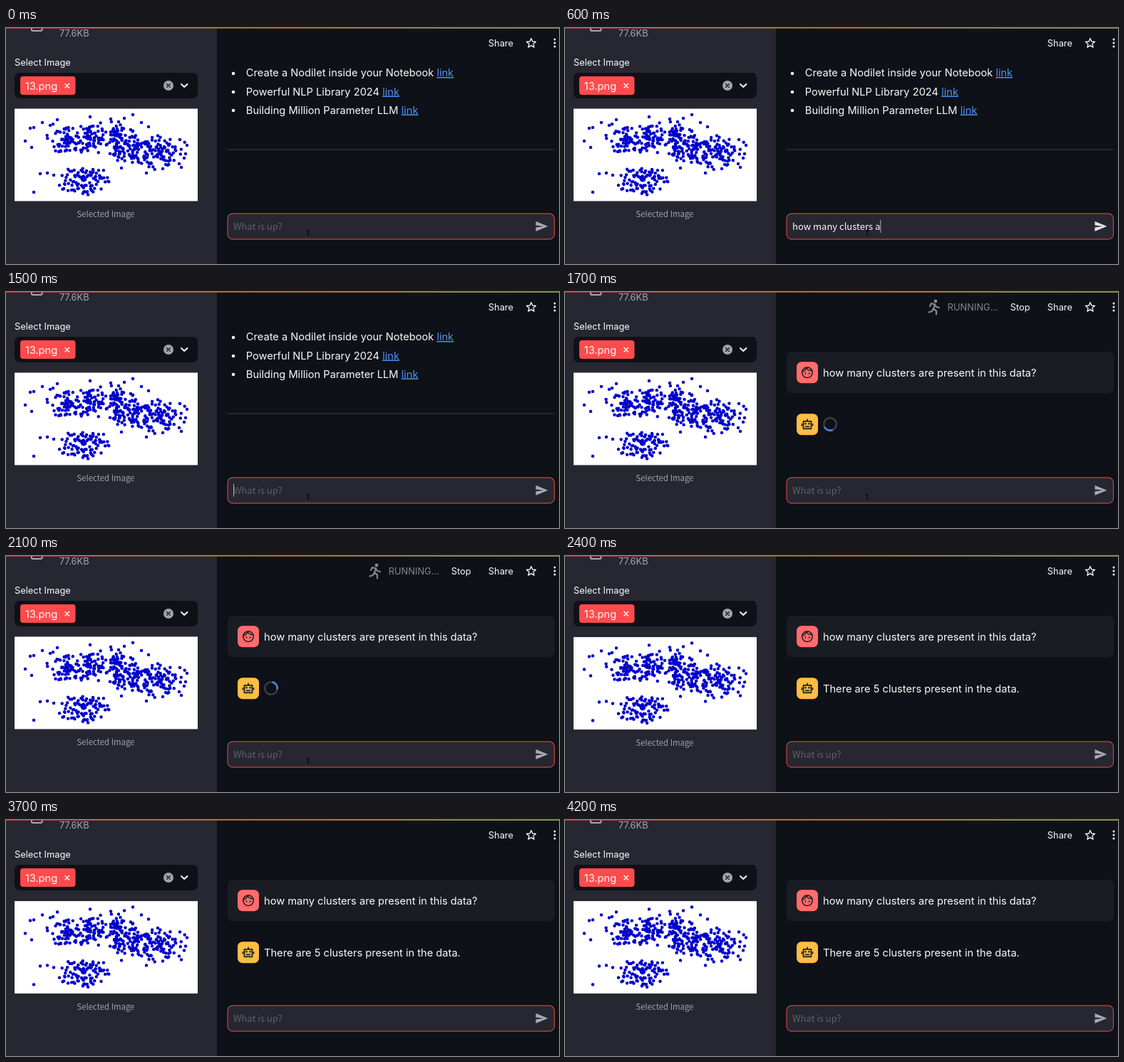
Recreate the animation shown at these times as an HTML page. Size 776 by 332 pixels, loop 4.3 s.

```html
<!DOCTYPE html>
<html lang="en">
<head>
<meta charset="utf-8">
<title>Chat about an image</title>
<style>
  html, body { margin: 0; width: 100%; height: 100%; overflow: hidden; background: #0e1117; }
  svg { display: block; width: 776px; height: 332px; }
  text { font: 14.65px Inter, sans-serif; fill: #fafafa; white-space: pre; }
  .small { font-size: 12.85px; }
  .source { font: 13px "Noto Sans CJK JP", "Noto Sans CJK SC", "Noto Sans CJK", sans-serif; }
  .link { fill: #4d92f5; text-decoration: underline; }
  .line { fill: none; stroke: #fafafa; stroke-width: 1.5; stroke-linecap: round; stroke-linejoin: round; }
  .dark { stroke: #1b1c22; }
</style>
</head>
<body>
<svg viewBox="0 0 776 332">
  <defs>
    <linearGradient id="glow">
      <stop stop-color="#ff4b4b"/><stop offset="1" stop-color="#fffd80"/>
    </linearGradient>
  </defs>
  <rect width="776" height="332" fill="#0e1117"/>

  <!-- sidebar -->
  <rect width="296" height="332" fill="#262730"/>
  <rect x="36" y="-12" width="14.5" height="16" rx="1.5" class="line" style="stroke:#a5a6ad;stroke-width:2"/>
  <text x="75" y="12" class="small" style="fill:#a5a6ad">77.6KB</text>
  <text x="12" y="53" class="small">Select Image</text>
  <rect x="12" y="63" width="257" height="36" rx="7" fill="#0e1117"/>
  <rect x="20" y="68" width="77.5" height="26" rx="4" fill="#ff4b4b"/>
  <text x="26.7" y="86.5">13.png</text>
  <path class="line" d="M83 78.5l5.5 5.5m0-5.5l-5.5 5.5"/>
  <circle cx="228" cy="81" r="7" fill="#a3a4ab"/>
  <path class="line dark" d="M225.7 78.7l4.6 4.6m0-4.6l-4.6 4.6"/>
  <path class="line" style="stroke-width:2" d="M246 79l4.2 4 4.2-4"/>
  <g id="preview">
    <rect x="12" y="113.5" width="257" height="130" fill="#fff"/>
    <path id="dots" fill="none" stroke="#0000cd" stroke-width="4.5" stroke-linecap="round"/>
    <text x="99.5" y="266" class="source" style="font-size:11.35px;fill:#a0a1a8">Selected Image</text>
  </g>

  <!-- toolbar -->
  <text x="676.8" y="25.5" class="small">Share</text>
  <path id="star" class="line" style="stroke-width:1.3"/>
  <g fill="#fafafa"><circle cx="770" cy="16" r="1.5"/><circle cx="770" cy="21" r="1.5"/><circle cx="770" cy="26" r="1.5"/></g>
  <g id="running">
    <circle cx="520" cy="13" r="2.4" fill="#85878d"/>
    <path class="line" style="stroke:#85878d;stroke-width:2.2" d="M512 20l2-4 5 1.5-2 6 4 3v5M517 23l-2 4-4.5 1.5M519 17.5l2 3.5 4 1"/>
    <text x="536.8" y="25.5" class="small" style="fill:#85878d">RUNNING...</text>
    <text x="624.8" y="25.5" class="small">Stop</text>
  </g>

  <g id="links">
    <g fill="#fafafa"><circle cx="319" cy="64" r="2.3"/><circle cx="319" cy="90" r="2.3"/><circle cx="319" cy="116" r="2.3"/></g>
    <text x="336.8" y="68">Create a Nodilet inside your Notebook <tspan class="link">link</tspan></text>
    <text x="336.8" y="94.5">Powerful NLP Library 2024 <tspan class="link">link</tspan></text>
    <text x="336.8" y="120.5">Building Million Parameter LLM <tspan class="link">link</tspan></text>
    <rect x="311" y="170.5" width="459" height="1" fill="#3b3e46"/>
  </g>

  <g id="chat">
    <rect x="311" y="84" width="459" height="58.5" rx="7" fill="#1a1c24"/>
    <g transform="translate(340 113.3)">
      <rect x="-15" y="-15" width="30" height="30" rx="7" fill="#ff6c6c"/>
      <circle class="line dark" r="7.3"/>
      <path class="line dark" d="M-6.5-1.5q4-1 5.5-5 3 4.5 8 4"/>
      <g fill="#1b1c22"><circle cx="-2.7" cy="1.3" r="1.1"/><circle cx="2.7" cy="1.3" r="1.1"/></g>
    </g>
    <text x="362" y="118.6" id="question"></text>
    <g transform="translate(340 186.3)">
      <rect x="-15" y="-15" width="30" height="30" rx="7" fill="#ffbd45"/>
      <path class="line dark" style="stroke-width:1.7" d="M-5.5-4.5h11v10.500h-11zM0-4.500v-2.500M-7.500-.5v2M7.500-.5v2M-2.500 3h5"/>
      <g fill="#1b1c22"><circle cx="-2.500" cy="-1" r="1.300"/><circle cx="2.500" cy="-1" r="1.300"/></g>
    </g>
  </g>
  <g id="spinner" fill="none" stroke-width="2.6">
    <circle cx="372" cy="186" r="8.8" stroke="#3a3c44"/>
    <path d="M365.78 192.22A8.8 8.8 0 0 0 378.22 192.22" stroke="#4a83dc"/>
  </g>
  <text id="answer" x="362" y="191.5">There are 5 clusters present in the data.</text>

  <!-- prompt -->
  <rect x="311" y="261.2" width="458.5" height="36" rx="7" fill="#262730" stroke="#c8443f" stroke-width="1.2"/>
  <text id="prompt" x="319" y="284" class="source"></text>
  <rect id="caret" y="270" width="1" height="18" fill="#b4b4ba"/>
  <path id="pointer" d="M422 285h4m-2 0v6m-1 0h3" stroke="#0b0c10" stroke-width="1.3" fill="none"/>
  <path id="send" d="M743.5 272l17 7-17 7v-5.4l11-1.6-11-1.6z"/>

  <rect width="776" height="1" fill="url(#glow)" opacity=".5"/>
</svg>
<script>
const $ = id => document.getElementById(id);
const show = (id, on) => $(id).setAttribute('visibility', on ? 'visible' : 'hidden');

const LOOP = 4300, STEP = 100;
const SENT = 1500, ASKED = 1600, ANSWERED = 2200;
const QUESTION = 'how many clusters are present in this data?';
$('question').textContent = QUESTION;

$('star').setAttribute('d', 'M' + Array.from({length: 10}, (_, i) => {
  const r = i % 2 ? 3.1 : 7, a = i * Math.PI / 5;
  return `${737 + r * Math.sin(a)} ${21.5 - r * Math.cos(a)}`;
}).join('L') + 'Z');

let seed = 13;
const random = () => (seed = seed * 16807 % 2147483647) / 2147483647;
const spread = () => (random() + random() / 2) / .75 - 1;

// x, y, half width, half height, slope, count
const clusters = [
  [104, 155, 52, 22, -.05, 135],
  [155, 159, 11, 28, 0, 45],
  [190, 168, 46, 27, .22, 150],
  [228, 173, 25, 22, .2, 25],
  [109, 216, 41, 23, 0, 95]
];
const strays = [[178,122],[118,125],[72,129],[51,133],[39,140],[34,141],[27,159],[36,168],
  [254,165],[244,157],[250,183],[252,177],[243,191],[246,196],[220,198],[197,204],[162,197],
  [39,231],[48,205],[58,204],[67,207],[62,137],[147,128],[166,127],[158,132],[190,133],[200,139]];
const points = clusters.flatMap(([x, y, w, h, slope, count]) =>
  Array.from({length: count}, () => {
    const dx = w * spread();
    return [x + dx, y + slope * dx + h * spread()];
  })).concat(strays);
$('dots').setAttribute('d', points.map(([x, y]) => `M${x.toFixed(1)} ${y.toFixed(1)}h0`).join(''));

function draw(now) {
  const t = Math.floor(now % LOOP / STEP) * STEP;
  const asked = t >= ASKED, answered = t >= ANSWERED;
  show('links', !asked);
  show('chat', asked);
  show('running', asked && !answered);
  show('spinner', asked && !answered);
  show('answer', answered);
  show('pointer', !answered);
  $('spinner').setAttribute('transform', `rotate(${(t - 1700) / 250 * 360 + 20} 372 186)`);
  $('preview').setAttribute('transform', `translate(0 ${answered ? .6 : 0})`);

  const typed = t < SENT ? QUESTION.slice(0, Math.round(t / 600 * 19)) : '';
  const prompt = $('prompt');
  prompt.textContent = typed || 'What is up?';
  prompt.style.fill = typed ? '#fafafa' : '#5f6068';
  $('send').setAttribute('fill', typed ? '#e4e4e8' : '#a9abb3');
  $('caret').setAttribute('x', 319 + (typed ? prompt.getComputedTextLength() : 0));
  show('caret', typed || t > 0 && Math.floor(t / 176) % 2 === 0);
}

const start = performance.now();
(function tick() {
  draw(performance.now() - start);
  requestAnimationFrame(tick);
})();
</script>
</body>
</html>
```
